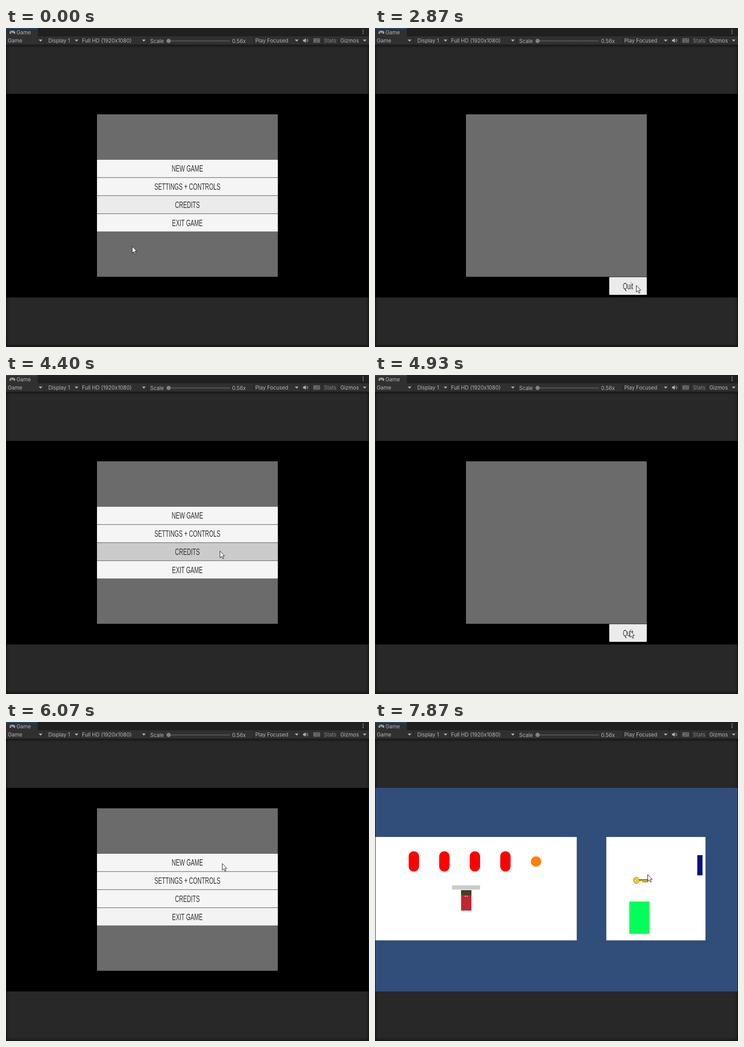
An HTML page for the animation above (8 s loop, 798x702 px).

```html
<!DOCTYPE html>
<html lang="en">
<head>
<meta charset="utf-8">
<title>Game menu</title>
<style>
html, body { margin: 0; width: 100%; height: 100%; overflow: hidden; background: #282828; }
svg { display: block; }
.ui { font: 11.5px Inter, sans-serif; fill: #b4b4b4; }
.label { font: 19.5px "Liberation Sans", Arial, sans-serif; fill: #323232; text-anchor: middle; }
</style>
</head>
<body>
<svg width="798" height="702" viewBox="0 0 798 702">
  <defs>
    <linearGradient id="down" x2="0" y2="1">
      <stop offset="0" stop-color="#161616"/><stop offset="1" stop-color="#282828"/>
    </linearGradient>
    <linearGradient id="up" x2="0" y2="1">
      <stop offset="0" stop-color="#282828"/><stop offset="1" stop-color="#191919"/>
    </linearGradient>
    <linearGradient id="side">
      <stop offset="0" stop-color="#111" stop-opacity=".55"/><stop offset="1" stop-color="#111" stop-opacity="0"/>
    </linearGradient>
  </defs>

  <rect width="798" height="702" fill="#282828"/>
  <rect y="37" width="798" height="7" fill="url(#down)"/>
  <rect y="694" width="798" height="7" fill="url(#up)"/>
  <rect y="37" width="7" height="664" fill="url(#side)"/>
  <rect y="37" width="7" height="664" fill="url(#side)" transform="matrix(-1 0 0 1 798 0)"/>
  <path d="M0 701.5H798M.5 37V702M797.5 37V702" stroke="#141414"/>

  <g id="bar" class="ui">
    <rect width="798" height="18" fill="#202020"/>
    <rect width="70" height="18" fill="#303030"/>
    <rect width="70" height="2" fill="#234a6c"/>
    <rect y="18" width="798" height="19" fill="#303030"/>
    <path d="M70 17.5H798M0 37H798" stroke="#1a1a1a"/>
    <path d="M11 6h6c2 0 3.3 2.2 3.3 4.5S18.500 13.500 17 12l-1.200-1.200h-3.600L11 12c-1.500 1.500-3.300.8-3.300-1.500S9 6 11 6z" fill="#aaa"/>
    <path d="M9.700 9h3M11.200 7.500v3" stroke="#303030"/>
    <g fill="#303030"><circle cx="15.500" cy="9.500" r=".8"/><circle cx="17.300" cy="8" r=".8"/></g>
    <g fill="#b4b4b4"><circle cx="785" cy="4.500" r="1.100"/><circle cx="785" cy="8.300" r="1.100"/><circle cx="785" cy="12.100" r="1.100"/></g>
    <path d="M357 28.500H492" stroke="#585858" stroke-width="2"/>
    <circle cx="357.500" cy="28.500" r="4.700" fill="#828282"/>
    <path d="M653 25.500h2.500l3.500-3v10l-3.500-3H653z" fill="#b4b4b4"/>
    <path d="M660.500 25.500q1.500 2 0 4M662.300 23.800q3 3.700 0 7.400" fill="none" stroke="#b4b4b4"/>
    <path d="M676.500 23.500h13v8h-13zM676.500 26.200h13M676.500 28.900h13M680 23.500v2.700M684 23.500v2.700M678.500 26.200v2.700M682 26.200v2.700M686 26.200v2.700M680 28.900v2.600M686 28.900v2.600" fill="none" stroke="#989898" stroke-width=".9"/>
  </g>

  <g id="menu">
    <rect x="1" y="145" width="796" height="448"/>
    <rect x="200" y="190" width="397.500" height="357.500" rx="1" fill="#6b6b6b"/>
    <g id="rows"></g>
    <g id="quit"></g>
  </g>

  <g id="level">
    <rect x="1" y="145" width="796" height="448" fill="#314d79"/>
    <path d="M1 253H443.500V480.500H1zM508.500 253H726.500V480.500H508.500z" fill="#fff"/>
    <g id="pills" fill="#f00"></g>
    <circle cx="354" cy="307" r="11.300" fill="#ff8000"/>
    <rect x="169.500" y="359.500" width="61.500" height="9.300" fill="#cbcbcb"/>
    <rect x="189.300" y="370" width="22.700" height="45" fill="#be2633"/>
    <rect x="189.300" y="370" width="22.700" height="11" fill="#493c2b"/>
    <path d="M197.500 383.500h2M201.500 383.500h2" stroke="#f3d5d5" stroke-width="2"/>
    <path d="M580 346.500h20.500v6h-2.500v-2h-2v2.500h-3v-2.500h-2v2h-2.500v-3h-8.500z" fill="#e8b820" stroke="#7d5a10" stroke-width=".7"/>
    <path d="M580 347h20" stroke="#5d430c" stroke-width="1.200"/>
    <ellipse cx="574.500" cy="348.500" rx="6.300" ry="7.200" fill="#f6c92c" stroke="#8a6414" stroke-width=".8"/>
    <circle cx="572.300" cy="348.500" r="2.100" fill="#fff" stroke="#8a6414" stroke-width=".6"/>
    <rect x="559" y="395" width="44.500" height="71" fill="#00ff5a"/>
    <rect x="708.500" y="293" width="11.500" height="44.500" fill="#001282"/>
  </g>

  <path id="cursor" d="M.5.5V15.300L3.900 12 6.200 17.500 8.500 16.500 6.200 11.200H10.500Z" fill="#fff" stroke="#000" stroke-width=".9"/>
</svg>

<script>
const LOOP = 8000, TICK = 1000 / 15;
const $ = id => document.getElementById(id);
const NORMAL = '#f5f5f5', HOVER = '#ebebeb', PRESSED = '#cbcbcb';

function add(parent, tag, attrs, text) {
  const el = document.createElementNS('http://www.w3.org/2000/svg', tag);
  for (const k in attrs) el.setAttribute(k, attrs[k]);
  if (text) el.textContent = text;
  parent.appendChild(el);
  return el;
}

function button(parent, x, y, w, h, text) {
  const face = add(parent, 'rect', { x, y, width: w, height: h, rx: 1 });
  add(parent, 'text', { class: 'label', transform: `translate(${x + w / 2} ${y + h / 2 + 7}) scale(.636 1)` }, text);
  return face;
}

// Toolbar
const bar = $('bar');
[['Game', 23, 14], ['Game', 4, 32], ['Display 1', 93, 32], ['Full HD (1920x1080)', 167, 32], ['Scale', 317, 32.5],
 ['0.56x', 497, 32.5], ['Play Focused', 548, 32], ['Stats', 699, 32], ['Gizmos', 735, 32]]
  .forEach(([s, x, y]) => add(bar, 'text', s === 'Stats' ? { x, y, fill: '#858585' } : { x, y }, s));
for (const x of [76, 155, 303, 639, 788.5])
  add(bar, 'path', { d: `M${x - 4} 25.5h8l-4 4.500z`, fill: '#b4b4b4' });
for (const x of [84.5, 163.5, 311.5, 544.5, 647.5, 669.5, 694.5, 731.5])
  add(bar, 'path', { d: `M${x} 19V36`, stroke: '#202020' });

const rows = ['NEW GAME', 'SETTINGS + CONTROLS', 'CREDITS', 'EXIT GAME']
  .map((s, i) => button($('rows'), 200, 290 + i * 39.75, 397.5, 38.5, s));
const quitFace = button($('quit'), 515, 548.3, 82.5, 39, 'Quit');
for (let i = 0; i < 4; i++)
  add($('pills'), 'rect', { x: 74 + i * 67.1, y: 284.500, width: 22.800, height: 44.500, rx: 11.400 });

// Pointer: [tick, x, y]
const path = [
  [0, 277, 480], [1, 312, 570], [2, 305, 617], [3, 305, 617], [4, 268, 646],
  [9, 320, 666], [13, 374, 612], [17, 433, 542], [18, 433, 542],
  [22, 515, 488], [26, 594, 405], [31, 520, 346], [34, 520, 346],
  [39, 558, 510], [43, 574, 566], [54, 574, 566], [59, 609, 498],
  [64, 470, 387], [68, 470, 387], [74, 560, 562], [77, 560, 562],
  [82, 473, 438], [88, 477, 365], [91, 475, 311], [102, 475, 311],
  [106, 609, 320], [116, 609, 320], [118, 599, 335], [120, 599, 335]
];

function pointer(k) {
  const i = path.findIndex(p => p[0] > k);
  const a = path[i - 1], b = path[i], u = (k - a[0]) / (b[0] - a[0]);
  return [a[1] + (b[1] - a[1]) * u, a[2] + (b[2] - a[2]) * u];
}

const within = (k, a, b) => k >= a && k < b;
const show = (id, on) => $(id).setAttribute('display', on ? 'inline' : 'none');

function draw(ms) {
  const k = Math.min(119, Math.floor((ms % LOOP + 5) / TICK));
  const panel = within(k, 34, 52) || within(k, 68, 76);
  show('menu', k < 113);
  show('level', k >= 113);
  show('rows', !panel);
  show('quit', panel);

  const fills = [
    k >= 100 ? PRESSED : NORMAL,
    within(k, 32, 34) ? PRESSED : NORMAL,
    within(k, 65, 68) ? PRESSED : k < 65 ? HOVER : NORMAL,
    within(k, 82, 85) ? '#eeeeee' : k >= 85 ? '#f3f3f3' : NORMAL
  ];
  rows.forEach((r, i) => r.setAttribute('fill', fills[i]));
  quitFace.setAttribute('fill', within(k, 42, 52) || k >= 73 ? HOVER : NORMAL);

  show('cursor', !within(k, 5, 9));
  const [x, y] = pointer(k);
  $('cursor').setAttribute('transform', `translate(${Math.round(x)} ${Math.round(y)})`);
}

const start = performance.now();
function frame() {
  draw(performance.now() - start);
  requestAnimationFrame(frame);
}
draw(0);
requestAnimationFrame(frame);
</script>
</body>
</html>
```
